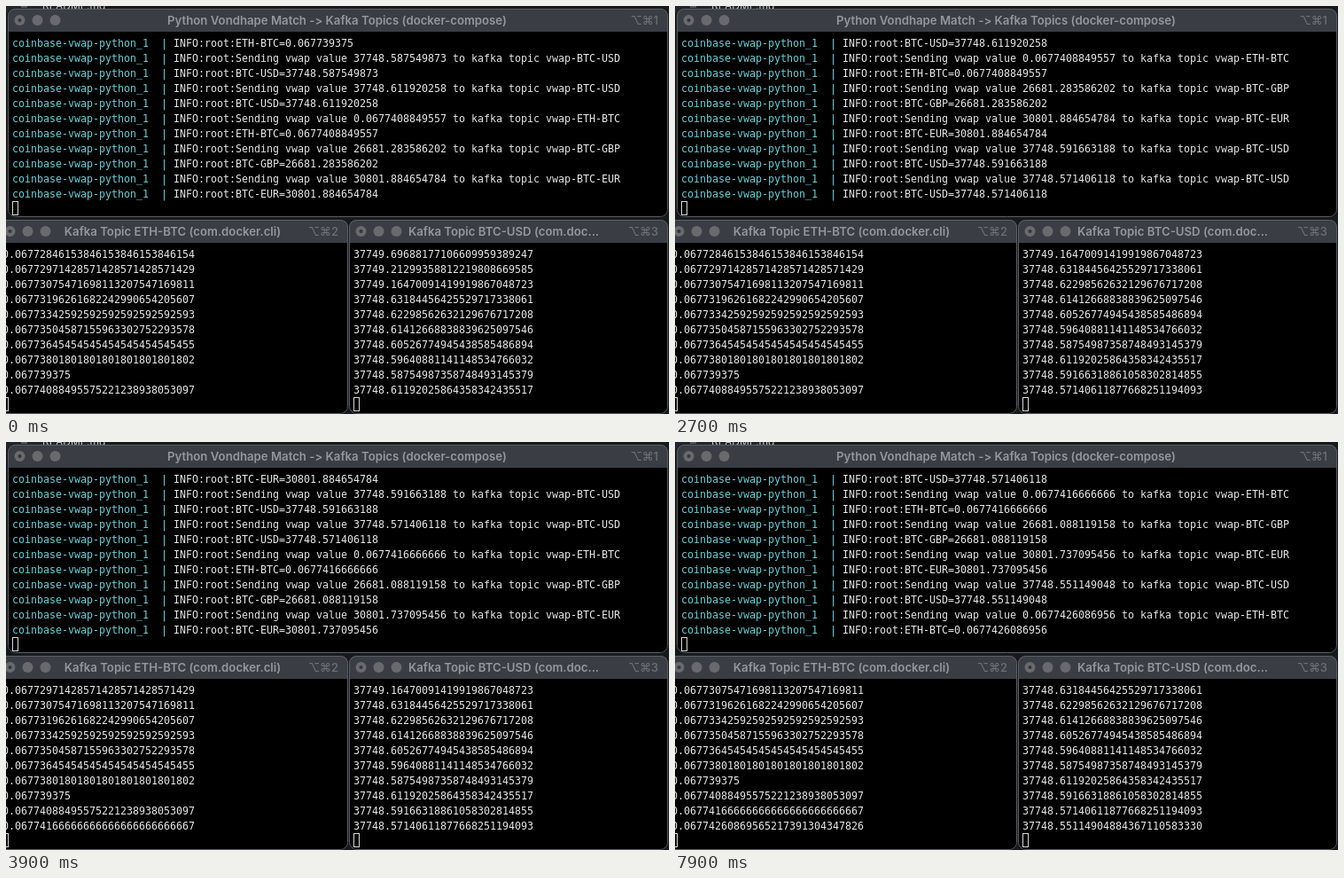
Write an HTML page with a canvas that moves like this. It is 748 by 460 pixels and loops after 8000 ms.

```html
<!DOCTYPE html>
<html lang="en">
<head>
<meta charset="utf-8">
<title>Kafka topics</title>
<style>
html, body { margin: 0; width: 100%; height: 100%; overflow: hidden; background: #000; }
canvas { display: block; width: 748px; height: 460px; }
</style>
</head>
<body>
<canvas id="stage" width="748" height="460"></canvas>
<script>
const ctx = document.getElementById('stage').getContext('2d');
const LOOP = 8000;
const ROW = 17;
const MONO = '11.63px "DejaVu Sans Mono", monospace';
const UI = 'Inter, sans-serif';
const WHITE = '#e6e6e6';
const CYAN = '#62d2d6';

// Each trade adds two log lines and may scroll one topic window.
const tradeTimes = [100, 2700, 2900, 3700, 3900, 7700, 7900];
const tradeOrder = 'ETH-BTC BTC-USD BTC-USD ETH-BTC BTC-GBP BTC-EUR BTC-USD BTC-USD ETH-BTC BTC-GBP BTC-EUR BTC-USD ETH-BTC'.split(' ');
const SHOWN = 6;   // trades already in the log at the start
const EARLIER = 8; // topic values older than the log

// Quotient below 0.1 to 28 significant digits.
function quotient(num, den) {
  const digits = (BigInt(num) * 10n ** 29n + BigInt(den) / 2n) / BigInt(den);
  return '0.' + digits.toString().padStart(29, '0').replace(/0+$/, '');
}

// Running mean of the trade prices, in units of 0.00001.
function ethSeries() {
  const ticks = [0, 6, 4, 6, 9, 11, 9, 11, 9, 11, 3, 5];
  let sum = 704376 - 6780;
  return ticks.map((tick, i) => {
    sum += 6780 + tick;
    return quotient(sum, (104 + i) * 100000);
  });
}

function randomDigits(seed, count) {
  let digits = '';
  while (digits.length < count) {
    seed = (seed * 16807) % 2147483647;
    digits += Math.floor(seed / 2147483647 * 10);
  }
  return digits;
}

// Linear drift between turning points, with random trailing digits.
function usdSeries() {
  const turns = [
    [0, 37749.696881771], [1, 37749.212993588], [2, 37749.164700914],
    [3, 37748.631844564], [8, 37748.587549873], [9, 37748.611920258], [12, 37748.551149048]
  ];
  const series = [];
  for (let i = 0; i <= 12; i++) {
    const k = Math.max(1, turns.findIndex(turn => turn[0] >= i));
    const [[i0, v0], [i1, v1]] = turns.slice(k - 1, k + 1);
    const value = v0 + (v1 - v0) * (i - i0) / (i1 - i0);
    series.push(value.toFixed(9) + randomDigits(7919 * (i + 1), 14));
  }
  return series;
}

const topics = {
  'ETH-BTC': ethSeries(),
  'BTC-USD': usdSeries(),
  'BTC-GBP': ['26681.283586202', '26681.088119158'],
  'BTC-EUR': ['30801.884654784', '30801.737095456']
};

const countOf = (pair, trades) => tradeOrder.slice(0, trades).filter(p => p === pair).length;

const log = tradeOrder.flatMap((pair, i) => {
  const series = topics[pair];
  const offset = series.length > EARLIER ? EARLIER : 0;
  const value = series[offset + countOf(pair, i)].slice(0, 15);
  return [`Sending vwap value ${value} to kafka topic vwap-${pair}`, `${pair}=${value}`];
}).map(line => 'INFO:root:' + line);

function text(str, x, y, color, font = MONO, align = 'left') {
  ctx.font = font;
  ctx.fillStyle = color;
  ctx.textAlign = align;
  ctx.fillText(str, x, y);
}

function dot(x, y, r, color) {
  ctx.fillStyle = color;
  ctx.beginPath();
  ctx.arc(x, y, r, 0, Math.PI * 2);
  ctx.fill();
}

function frame(x, y, w, h, title, titleX, keys, keysX) {
  ctx.save();
  ctx.beginPath();
  ctx.roundRect(x, y, w, h, 8);
  ctx.fillStyle = '#000';
  ctx.fill();
  ctx.clip();
  ctx.fillStyle = '#3a3e44';
  ctx.fillRect(x, y, w, 26);
  ctx.restore();

  ctx.strokeStyle = '#5b5e62';
  ctx.lineWidth = 1;
  ctx.beginPath();
  ctx.roundRect(x + 0.5, y + 0.5, w - 1, h - 1, 8);
  ctx.stroke();

  const mid = y + 13;
  for (let i = 0; i < 3; i++) dot(x + 13.5 + i * 20, mid, 6, '#686a6d');
  dot(x + 13.5, mid, 2, '#333539');
  text(title, titleX, mid + 4.5, '#94979b', '600 13.2px ' + UI, 'center');
  text(keys, keysX, mid + 4.5, '#6c6f74', '500 13px ' + UI, 'right');
}

function cursor(x, y) {
  ctx.strokeStyle = '#d8d8d8';
  ctx.lineWidth = 1;
  ctx.strokeRect(x + 0.5, y + 0.5, 6, 15);
}

function backdrop() {
  ctx.fillStyle = '#17191d';
  ctx.fillRect(0, 0, 748, 460);
  ctx.fillStyle = '#22262b';
  ctx.fillRect(0, 0, 106, 8);
  text('README.md', 41, 4, '#c4c6c8', '12px ' + UI);
  ctx.fillStyle = '#55595e';
  ctx.fillRect(17, 0, 7, 2);
}

function topicRows(pair, trades, x) {
  const end = EARLIER + countOf(pair, trades);
  topics[pair].slice(end - 10, end).forEach((value, i) => text(value, x, 284 + i * ROW, WHITE));
  cursor(x, 441);
}

function draw(t) {
  const steps = tradeTimes.filter(time => t >= time).length;
  const trades = SHOWN + steps;
  backdrop();
  // The zero-width non-joiner keeps the arrow as two characters.
  frame(2, 3, 745, 235, 'Python Vondhape Match -\u200c> Kafka Topics (docker-compose)', 373.5, '⌥⌘1', 736);
  frame(-9, 241, 395, 219, 'Kafka Topic ETH-BTC (com.docker.cli)', 188, '⌥⌘2', 375);
  frame(387, 241, 360, 219, 'Kafka Topic BTC-USD (com.doc...', 561.5, '⌥⌘3', 736);

  log.slice(2 * trades - 11, 2 * trades).forEach((line, i) => {
    const y = 46 + i * ROW;
    text('coinbase-vwap-python_1  |', 7, y, CYAN);
    text(line, 189, y, WHITE);
  });
  cursor(7, 220);

  topicRows('ETH-BTC', trades, -4);
  topicRows('BTC-USD', trades, 392);
}

const start = performance.now();
function tick() {
  draw((performance.now() - start) % LOOP);
  requestAnimationFrame(tick);
}
tick();
</script>
</body>
</html>
```
